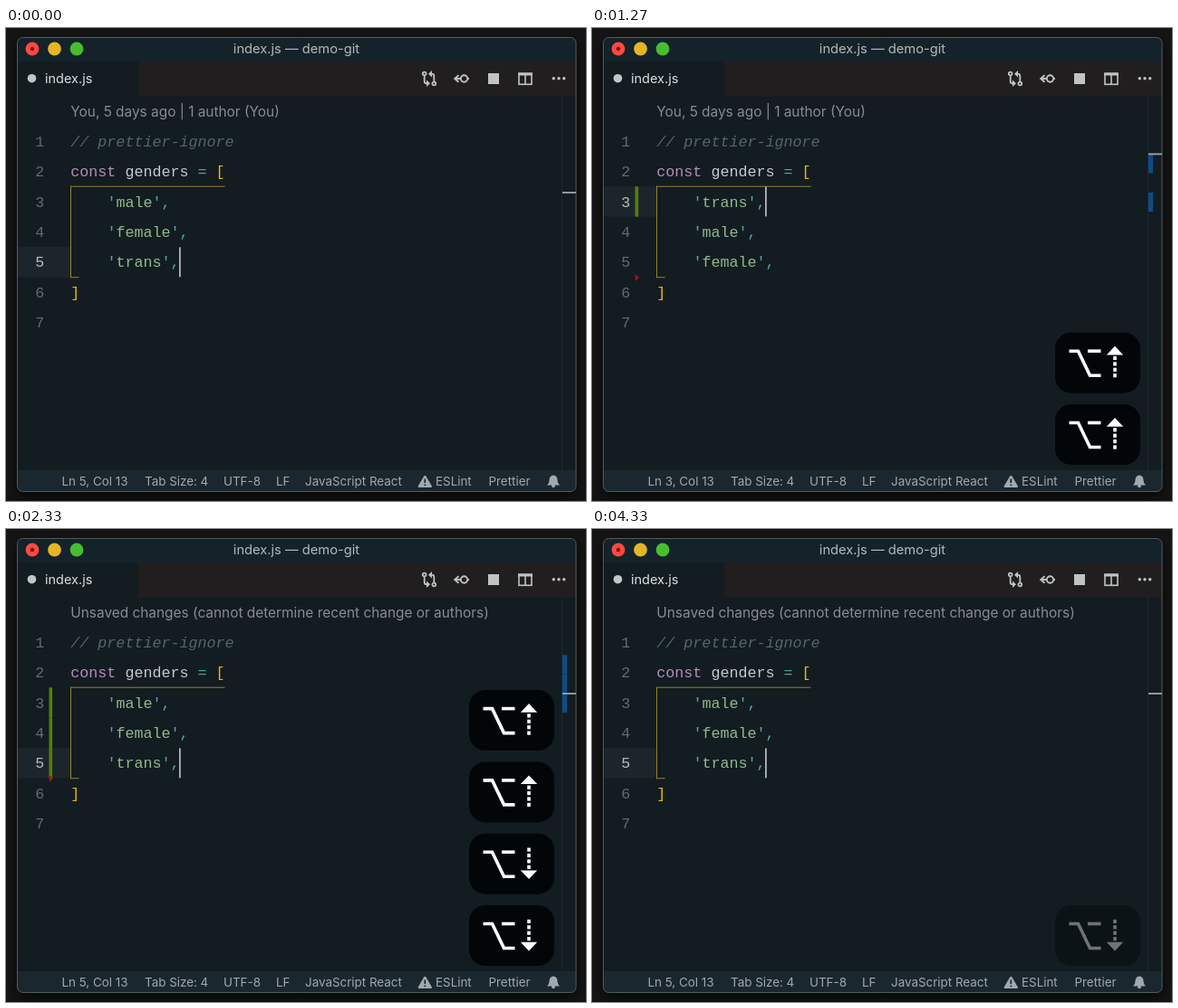
These frames come from a looping animation (640x523 px, 4390 ms). An HTML page with a canvas:

```html
<!DOCTYPE html>
<html lang="en">
<head>
<meta charset="utf-8">
<title>Moving lines in an editor</title>
<style>
  html, body { margin: 0; width: 100%; height: 100%; overflow: hidden; background: #161515; }
  canvas { display: block; width: 640px; height: 523px; }
</style>
</head>
<body>
<canvas id="stage"></canvas>
<script>
const W = 640, H = 523, LOOP = 4390, TICK = 200 / 3;
const MONO = '"Liberation Mono", "Noto Sans Mono", monospace';
const SANS = 'Inter, Roboto, sans-serif';
const ICON = '#bfc3c4';

const canvas = document.getElementById('stage');
const ctx = canvas.getContext('2d');
const dpr = window.devicePixelRatio || 1;
canvas.width = W * dpr;
canvas.height = H * dpr;

// Each edit moves the 'trans' line to a new row.
const EDITS = [
  { at: 400, row: 4, dir: -1 },
  { at: 933, row: 3, dir: -1 },
  { at: 1866, row: 4, dir: 1 },
  { at: 2266, row: 5, dir: 1 }
];
const KEY_LEAD = 66, KEY_HOLD = 2015, KEY_FADE = 200;
const BLINK = 500;
const LENS_AT = 1866;

// Change markers: rows in the gutter and rows in the overview ruler.
const DIFFS = [
  { at: 0, gutter: [], ruler: [] },
  { at: 666, gutter: [4], ruler: [4, 5] },
  { at: 933, gutter: [3], ruler: [3, 4, 5] },
  { at: 1200, gutter: [3], ruler: [3, 5] },
  { at: 1866, gutter: [3, 4], ruler: [3, 4, 5] },
  { at: 2266, gutter: [3, 4, 5], ruler: [3, 4, 5] },
  { at: 2466, gutter: [], ruler: [] }
];

const CODE_X = 71.3, CHAR = 10.02, ROW_H = 33.45;
const rowTop = n => 108.3 + (n - 1) * ROW_H;
const rulerY = n => 139.3 + (n - 3) * 21.3;

function rect(x, y, w, h, color) {
  ctx.fillStyle = color;
  ctx.fillRect(x, y, w, h);
}

function disc(x, y, r, color) {
  ctx.fillStyle = color;
  ctx.beginPath();
  ctx.arc(x, y, r, 0, Math.PI * 2);
  ctx.fill();
}

function poly(points, color) {
  ctx.fillStyle = color;
  ctx.beginPath();
  points.forEach(([x, y]) => ctx.lineTo(x, y));
  ctx.closePath();
  ctx.fill();
}

function line(points, color, width) {
  ctx.strokeStyle = color;
  ctx.lineWidth = width;
  ctx.beginPath();
  points.forEach(([x, y]) => ctx.lineTo(x, y));
  ctx.stroke();
}

function label(str, x, y, size, color, align = 'left') {
  ctx.font = `${size}px ${SANS}`;
  ctx.textAlign = align;
  ctx.fillStyle = color;
  ctx.fillText(str, x, y);
}

// Draws [text, colour] pieces one after another on the character grid.
function code(row, col, pieces, style = '') {
  ctx.font = `${style} 16.7px ${MONO}`;
  ctx.textAlign = 'left';
  for (const [str, color] of pieces) {
    ctx.fillStyle = color;
    ctx.fillText(str, CODE_X + col * CHAR, rowTop(row) + 22.3);
    col += str.length;
  }
}

function windowPath() {
  ctx.beginPath();
  ctx.roundRect(12.5, 10.5, 616.5, 502, 6);
}

function drawWindow() {
  rect(0, 0, W, H, '#161515');
  ctx.save();
  ctx.shadowColor = 'rgba(0,0,0,.7)';
  ctx.shadowBlur = 16 * dpr;
  ctx.shadowOffsetY = 6 * dpr;
  windowPath();
  ctx.fillStyle = '#121c21';
  ctx.fill();
  ctx.restore();

  ctx.save();
  windowPath();
  ctx.clip();
  rect(12, 10, 618, 27, '#14222a');
  rect(146, 37, 484, 38.5, '#211e20');
  rect(12, 489, 618, 25, '#1a272e');
  ctx.restore();
  windowPath();
  ctx.strokeStyle = '#4f5b60';
  ctx.lineWidth = 1;
  ctx.stroke();

  disc(29, 23, 7.4, '#fb4a40');
  disc(29, 23, 2.2, '#7c0b08');
  disc(53.5, 23, 7.4, '#e5b526');
  disc(78, 23, 7.4, '#48bd31');
  label('index.js — demo-git', 320.5, 28.2, 14.7, '#b3babc', 'center');
  disc(28.5, 55.7, 4.8, '#c3c6c7');
  label('index.js', 43, 61.2, 14.5, '#dcdfe0');
}

function drawToolbar() {
  // compare
  for (const turn of [0, Math.PI]) {
    ctx.save();
    ctx.translate(467, 56);
    ctx.rotate(turn);
    ctx.strokeStyle = ICON;
    ctx.lineWidth = 1.8;
    ctx.beginPath();
    ctx.arc(-5.3, -5.5, 1.9, 0, Math.PI * 2);
    ctx.moveTo(-5.3, -3.5);
    ctx.lineTo(-5.3, 3);
    ctx.quadraticCurveTo(-5.3, 5.3, -2.5, 5.3);
    ctx.stroke();
    poly([[-3, 1.6], [1, 5.3], [-3, 9]], ICON);
    ctx.restore();
  }
  // revision
  ctx.strokeStyle = ICON;
  ctx.lineWidth = 1.9;
  ctx.beginPath();
  ctx.arc(505.5, 56, 3.7, 0, Math.PI * 2);
  ctx.stroke();
  line([[499.5, 52.3], [495.2, 56], [499.5, 59.7]], ICON, 1.9);
  line([[495.5, 56], [502, 56]], ICON, 1.9);
  line([[509, 56], [511, 56]], ICON, 1.9);

  rect(532, 50, 12, 12, ICON);

  // split view
  ctx.strokeStyle = ICON;
  ctx.lineWidth = 1.6;
  ctx.strokeRect(566, 50.3, 14, 12);
  rect(565.2, 49.5, 15.6, 3, ICON);
  line([[573, 50], [573, 62]], ICON, 1.6);
  [604.3, 610, 615.7].forEach(x => disc(x, 55.8, 1.7, ICON));
}

function drawStatus(row) {
  const color = '#a0aaae';
  const items = [
    [`Ln ${row}, Col 13`, 61.5], ['Tab Size: 4', 153], ['UTF-8', 240], ['LF', 298],
    ['JavaScript React', 330], ['ESLint', 474], ['Prettier', 532.5]
  ];
  items.forEach(([str, x]) => label(str, x, 506.2, 13.4, color));

  ctx.lineJoin = 'round';
  const tri = [[462.3, 495.5], [469, 507], [455.6, 507]];
  poly(tri, color);
  line([...tri, tri[0]], color, 2);
  line([[462.3, 498.5], [462.3, 503]], '#1a272e', 1.7);
  rect(461.5, 504.5, 1.7, 1.7, '#1a272e');
  ctx.lineJoin = 'miter';

  ctx.fillStyle = color;
  ctx.beginPath();
  ctx.moveTo(597, 505.5);
  ctx.quadraticCurveTo(599.5, 503.5, 599.5, 500);
  ctx.quadraticCurveTo(599.5, 495, 604, 494.5);
  ctx.quadraticCurveTo(608.5, 495, 608.5, 500);
  ctx.quadraticCurveTo(608.5, 503.5, 611, 505.5);
  ctx.fill();
  disc(604, 506.3, 1.9, color);
}

function drawCode(row) {
  const teal = '#55a3a5', green = '#92ba8e', gold = '#e8b816';
  code(1, 0, [['// prettier-ignore', '#56656c']], 'italic');
  code(2, 0, [['const', '#b98cbb'], [' genders ', '#c4cad2'], ['= ', teal], ['[', gold]]);
  const words = ['male', 'female'];
  words.splice(row - 3, 0, 'trans');
  words.forEach((w, i) => code(3 + i, 4, [["'", teal], [w, green], ["',", teal]]));
  code(6, 0, [[']', gold]]);

  const guide = '#96802a';
  rect(71, 174.7, 170.5, 1, guide);
  rect(71, 174.7, 1, 101.5, guide);
  rect(71, 275.2, 9.5, 1, guide);

  for (let n = 1; n <= 7; n++) {
    ctx.font = `16.7px ${MONO}`;
    ctx.textAlign = 'center';
    ctx.fillStyle = n === row ? '#b6bcbf' : '#616c70';
    ctx.fillText(n, 37.2, rowTop(n) + 22.3);
  }
}

function drawMarkers(row, diff) {
  rect(613, 76, 1, 413, '#1d2a30');
  diff.gutter.forEach(n => rect(47.5, rowTop(n), 3.6, ROW_H, '#587c0c'));
  if (diff.gutter.length) poly([[47.8, 272], [52, 276], [47.8, 280]], '#a3151b');
  diff.ruler.forEach(n => rect(614, rulerY(n), 5, 21.3, '#0c4c87'));
  rect(614, rulerY(row) - 0.8, 15, 1.8, '#a2a6a7');
}

function drawKey(slot, dir, alpha) {
  const white = '#fff';
  ctx.save();
  ctx.globalAlpha = alpha;
  ctx.translate(511, 416 - slot * 79.3);
  ctx.fillStyle = '#030609';
  ctx.beginPath();
  ctx.roundRect(0, 0, 94, 67, 18);
  ctx.fill();
  line([[15.5, 20.5], [25.5, 20.5], [38.5, 47.5], [50.5, 47.5]], white, 3.6);
  line([[36, 20.5], [50.5, 20.5]], white, 3.6);
  ctx.translate(66, 32.7);
  ctx.scale(1, -dir);
  poly([[0, -17.7], [9.2, -8], [-9.2, -8]], white);
  for (let i = 0; i < 4; i++) rect(-1.8, -6.5 + i * 6.4, 3.6, 4.2, white);
  ctx.restore();
}

function drawKeys(t) {
  const shown = EDITS.filter(e => t >= e.at - KEY_LEAD);
  shown.reverse().forEach((e, slot) => {
    const age = t - (e.at - KEY_LEAD) - KEY_HOLD;
    const alpha = Math.min(1, 1 - age / KEY_FADE);
    if (alpha > 0) drawKey(slot, e.dir, alpha);
  });
}

function draw(t) {
  const edit = EDITS.filter(e => t >= e.at).pop();
  const diff = DIFFS.filter(d => t >= d.at).pop();
  const row = edit ? edit.row : 5;
  const caretOn = !edit || Math.floor((t - edit.at) / BLINK) % 2 === 0;

  ctx.setTransform(dpr, 0, 0, dpr, 0, 0);
  drawWindow();
  drawToolbar();
  rect(13, rowTop(row), 58, ROW_H, '#1d252c');
  const lens = t >= LENS_AT
    ? 'Unsaved changes (cannot determine recent change or authors)'
    : 'You, 5 days ago | 1 author (You)';
  label(lens, 71.3, 97.5, 15.4, '#868e91');
  drawCode(row);
  drawMarkers(row, diff);
  if (caretOn) rect(191.2, rowTop(row) + 0.3, 1.4, ROW_H - 0.6, '#dfe2e3');
  drawStatus(row);
  drawKeys(t);
}

// The screen updates at 15 steps per second.
const start = performance.now();
function tick() {
  const t = (performance.now() - start) % LOOP;
  draw(Math.floor((t + 4) / TICK) * TICK);
  requestAnimationFrame(tick);
}
tick();
</script>
</body>
</html>
```
